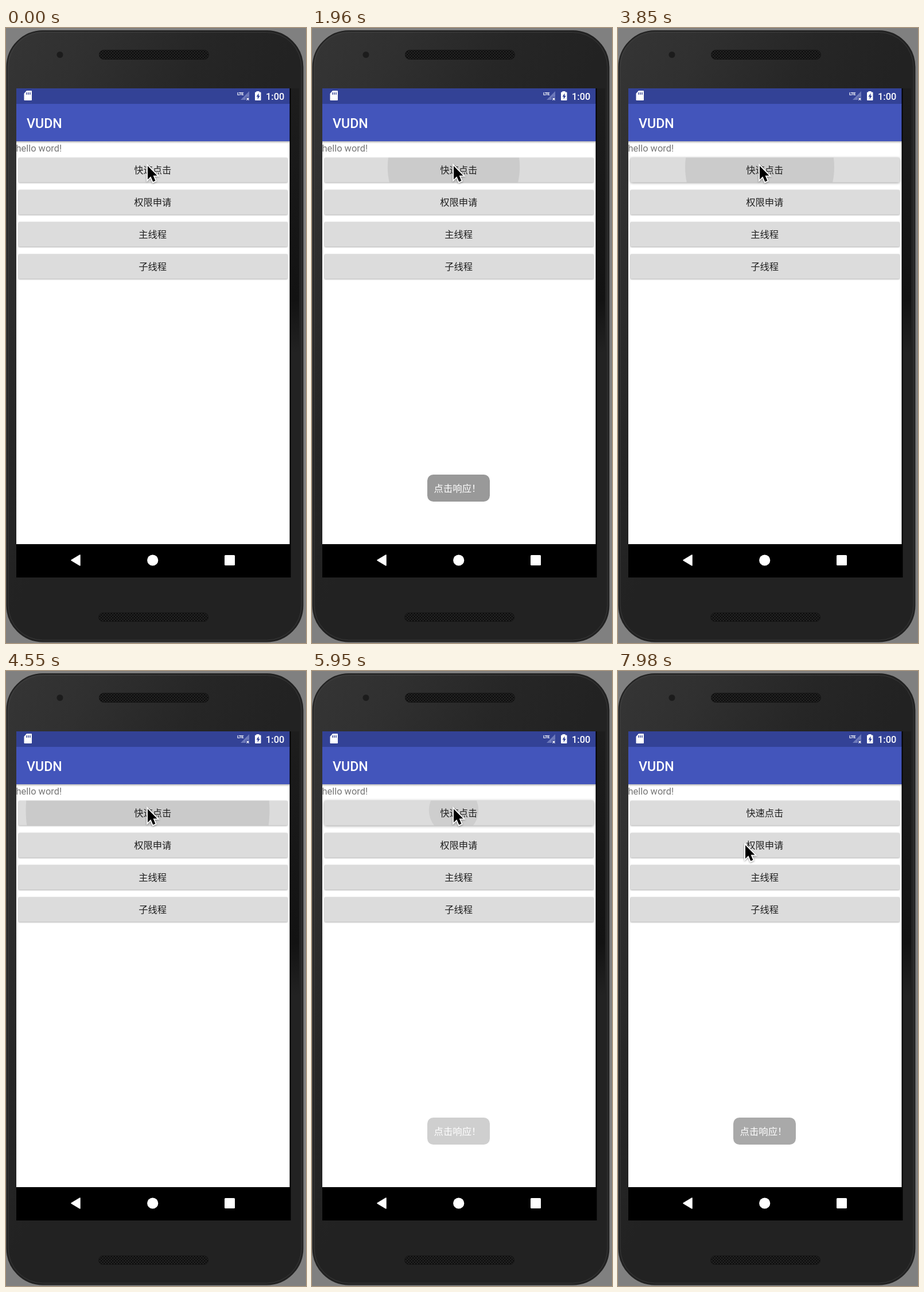
Write an HTML page that moves like this. It is 523 by 1070 pixels and loops after 8000 ms.

```html
<!DOCTYPE html>
<html lang="zh">
<head>
<meta charset="utf-8">
<style>
html, body { margin: 0; width: 100%; height: 100%; overflow: hidden; background: #808080; }
svg { display: block; width: 523px; height: 1070px; }
text { font-family: Roboto, "Noto Sans CJK SC", "Noto Sans CJK", sans-serif; font-size: 16.4px; }
.btn { fill: #dcdcdc; filter: drop-shadow(0 1px 1px rgba(0,0,0,.32)); }
.label { fill: #202020; text-anchor: middle; font-size: 16.3px; }
.white { fill: #fff; }
</style>
</head>
<body>
<svg id="stage" viewBox="0 0 523 1070">
  <defs>
    <linearGradient id="body" gradientUnits="userSpaceOnUse" x1="0" y1="0" x2="420" y2="210">
      <stop offset="0" stop-color="#353535"/>
      <stop offset=".3" stop-color="#303030"/>
      <stop offset=".68" stop-color="#262626"/>
      <stop offset="1" stop-color="#222"/>
    </linearGradient>
    <linearGradient id="side" x2="0" y2="1">
      <stop offset="0" stop-color="#121212" stop-opacity=".3"/>
      <stop offset=".8" stop-color="#121212"/>
      <stop offset="1" stop-color="#121212" stop-opacity="0"/>
    </linearGradient>
    <linearGradient id="fall" x2="0" y2="1">
      <stop offset="0" stop-opacity=".28"/>
      <stop offset="1" stop-opacity="0"/>
    </linearGradient>
    <pattern id="mesh" width="5" height="5" patternUnits="userSpaceOnUse">
      <rect width="5" height="5" fill="#222"/>
      <circle cx="1.2" cy="1.2" r="1.2" fill="#080808"/>
      <circle cx="3.7" cy="3.7" r="1.2" fill="#080808"/>
    </pattern>
    <clipPath id="clip"><rect x="21.5" y="225.5" width="469.5" height="43" rx="2"/></clipPath>
  </defs>

  <!-- phone -->
  <rect x="1.5" y="5" width="516" height="1062.5" rx="63" fill="url(#body)" stroke="#222" stroke-width="2"/>
  <rect x="4" y="7.5" width="511" height="1057.5" rx="60.5" fill="none" stroke="#484848" stroke-opacity=".6"/>
  <rect x="497" y="105" width="14" height="460" fill="url(#side)"/>
  <circle cx="94" cy="46.5" r="5.5" fill="#1c1c1c"/>
  <rect x="162.5" y="38.5" width="191" height="16" rx="8" fill="url(#mesh)" stroke="#151515"/>
  <rect x="161.5" y="1017.5" width="191" height="15" rx="7.5" fill="url(#mesh)" stroke="#151515"/>

  <!-- screen -->
  <rect x="18" y="105" width="478.5" height="851" fill="#000"/>
  <rect x="18" y="197" width="476.5" height="701" fill="#fff"/>
  <rect x="18" y="105" width="476.5" height="27.5" fill="#334296"/>
  <rect x="18" y="132" width="476.5" height="65" fill="#4355bb"/>
  <rect x="18" y="197" width="476.5" height="4" fill="url(#fall)"/>
  <path class="white" d="M36 109h8q1 0 1 1v15q0 1-1 1H32.5q-1 0-1-1V114z"/>
  <path d="M36 112v4M39 112v4M42 112v4" stroke="#334296" stroke-width="1.4"/>
  <text class="white" x="403" y="117" style="font-size:8px;font-weight:700;letter-spacing:-.8px">LTE</text>
  <path d="M424 110v15h-15z" fill="#6d79ba"/>
  <path d="M418 120h7v7h-7z" fill="#334296"/>
  <path d="M419.5 121.5l4 4m0-4l-4 4" stroke="#fff" stroke-width="1.4"/>
  <path class="white" d="M436.5 111.5V110h5v1.5h2q1 0 1 1V125q0 1-1 1H435q-1 0-1-1v-12.5q0-1 1-1z"/>
  <path d="M440.5 113.5l-4 6h2.2v4.5l4-6h-2.2z" fill="#334296"/>
  <text class="white" x="453" y="124.5" font-weight="500">1:00</text>
  <text class="white" x="36" y="173.5" style="font-size:23.2px;font-weight:500">VUDN</text>
  <text x="17.5" y="214.5" fill="#777">hello word!</text>

  <g id="buttons"></g>
  <g id="ripples" clip-path="url(#clip)" opacity=".077"></g>
  <g id="labels"></g>

  <g id="toast">
    <rect x="201" y="777" width="109" height="47" rx="10.5" fill="#999"/>
    <text class="white" x="212.5" y="807">点击响应！</text>
  </g>

  <path class="white" d="M114 926l15-9v18z" stroke="#fff" stroke-width="1.5" stroke-linejoin="round"/>
  <circle class="white" cx="255.7" cy="926" r="9.6"/>
  <rect class="white" x="381" y="917" width="18" height="18" rx="1.5"/>

  <g id="ring" fill="none">
    <circle cx="246.5" cy="241.3" r="38.2" stroke="#fff" stroke-opacity=".6" stroke-width="5.5"/>
    <circle cx="246.5" cy="241.3" r="38.2" stroke="#000" stroke-width="2.6"/>
  </g>
  <path id="cursor" d="M0 0V23.5L5.4 18.3L9.3 27.5L13.4 25.7L9.6 16.7H16.5Z" stroke="#fff" stroke-width="3.6"
    paint-order="stroke" style="filter:drop-shadow(0 1px 1.5px rgba(0,0,0,.4))"/>
</svg>
<script>
const LOOP = 8000, STEP = 70;
const $ = id => document.getElementById(id);
const clamp = v => Math.max(0, Math.min(1, v));

function add(parent, tag, attrs, text = '') {
  const el = document.createElementNS('http://www.w3.org/2000/svg', tag);
  for (const k in attrs) el.setAttribute(k, attrs[k]);
  el.textContent = text;
  return $(parent).appendChild(el);
}

const buttons = ['快速点击', '权限申请', '主线程', '子线程'].map((label, i) => {
  const y = 225.5 + i * 55.9;
  add('labels', 'text', { class: 'label', x: 255.7, y: y + 27.6 }, label);
  return add('buttons', 'rect', { class: 'btn', x: 21.5, y, width: 469.5, height: 43, rx: 2 });
});

// press time and how long the mouse button is held
const clicks = [
  [330, 110], [828, 150], [1230, 110], [1640, 110], [2050, 110], [2456, 110], [2780, 110],
  [3100, 110], [3489, 340], [3960, 110], [4280, 110], [4575, 120], [5178, 110],
  [5830, 110], [6398, 110], [6800, 110], [7200, 110]
].map(([at, hold]) => ({ at, hold, el: add('ripples', 'circle', { cx: 247, cy: 242 }) }));

const toasts = [350, 5880];
const toastAlpha = age => age < 0 ? 0 : Math.min(clamp(age / 150), clamp(1 - (age - 2060) / 240));

function draw(t) {
  let raise = 0, down = false;
  for (const { at, hold, el } of clicks) {
    const age = t - at, live = age >= 0 && age < 715;
    el.setAttribute('r', live ? age * .36 : 0);
    el.setAttribute('opacity', clamp(age / 150));
    if (age < 0) continue;
    down ||= age < hold;
    raise = Math.max(raise, clamp(age / 100) * clamp(1 - (age - hold) / 150));
  }
  buttons[0].style.filter =
    `drop-shadow(0 ${1 + raise}px ${1 + 1.5 * raise}px rgba(0,0,0,${.32 + .08 * raise}))`;
  $('ring').style.display = down ? '' : 'none';
  $('toast').setAttribute('opacity', Math.max(...toasts.map(s => toastAlpha(t - s))));

  const p = clamp((t - 7600) / 350), move = p * p * (3 - 2 * p);
  $('cursor').setAttribute('transform', `translate(${247 - 25 * move} ${240 + 63 * move})`);
}

function frame() {
  const t = performance.now() % LOOP;
  draw(Math.floor(t / STEP) * STEP);
  requestAnimationFrame(frame);
}
frame();
</script>
</body>
</html>
```
